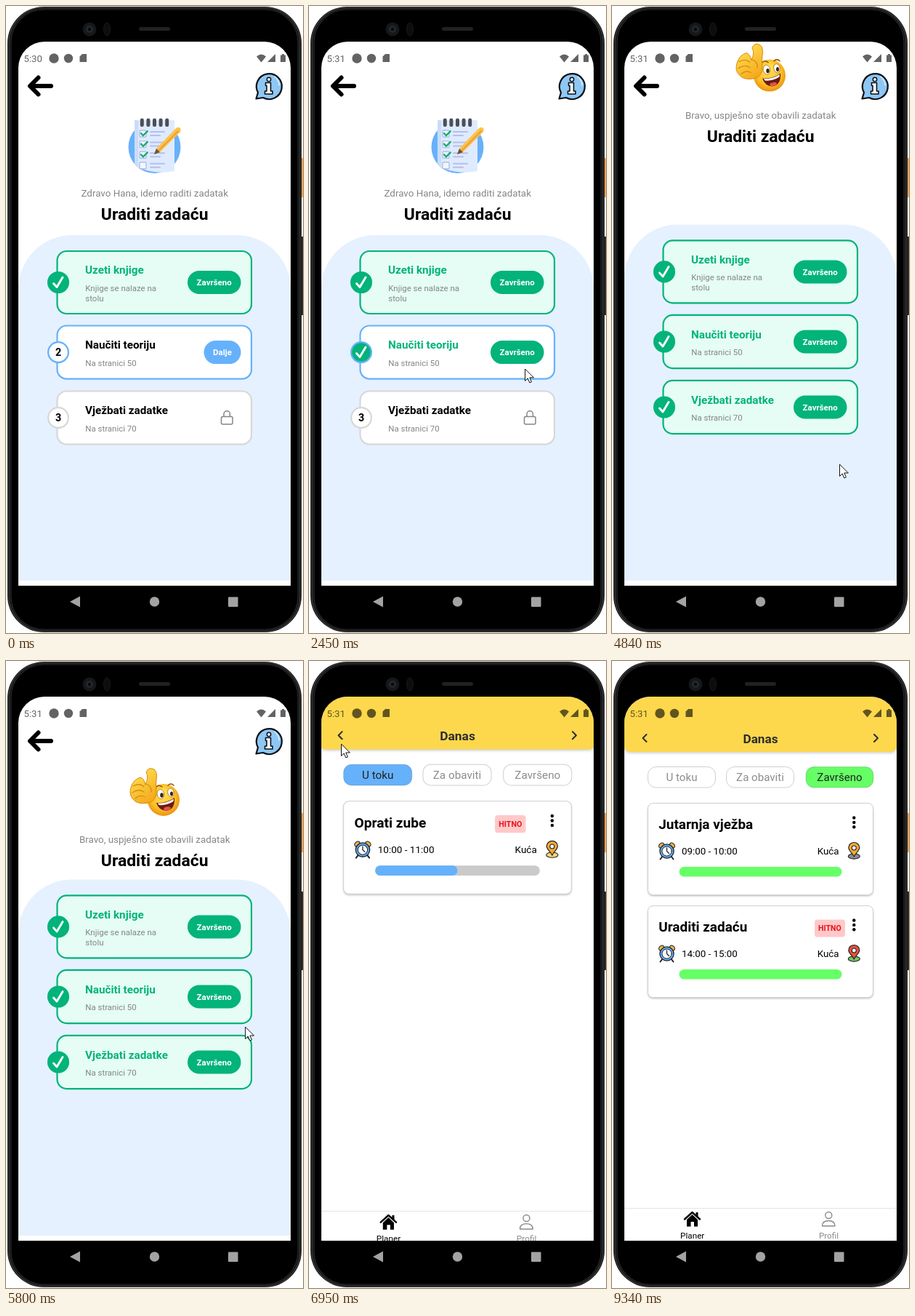
An HTML page with a canvas that plays this animation: 409x862 px, repeating every 9590 ms.

```html
<!DOCTYPE html>
<html lang="bs">
<head>
<meta charset="utf-8">
<title>Planer</title>
<style>
html, body { margin: 0; width: 100%; height: 100%; overflow: hidden; background: #fff; }
canvas { display: block; width: 409px; height: 862px; }
</style>
</head>
<body>
<canvas id="stage"></canvas>
<script>
const W = 409, H = 862, LOOP = 9590;
const GREEN = '#02b37a', MINT = '#e5fdf5', BLUE = '#66b1fb', GREY = '#d8d8d8', MUTED = '#858585';
const LIME = '#66ff66';
const canvas = document.getElementById('stage');
const c = canvas.getContext('2d');
const dpr = window.devicePixelRatio || 1;
canvas.width = W * dpr;
canvas.height = H * dpr;

const clamp = v => Math.max(0, Math.min(1, v));
const span = (t, a, b) => clamp((t - a) / (b - a));
const inOut = p => p < 0.5 ? 2 * p * p : 1 - 2 * (1 - p) * (1 - p);

function paint(fill, stroke, lw = 1) {
  if (fill) { c.fillStyle = fill; c.fill(); }
  if (stroke) { c.strokeStyle = stroke; c.lineWidth = lw; c.stroke(); }
}
function box(x, y, w, h, r, fill, stroke, lw) {
  c.beginPath();
  c.roundRect(x, y, w, h, r);
  paint(fill, stroke, lw);
}
function disc(x, y, r, fill, stroke, lw) {
  c.beginPath();
  c.arc(x, y, r, 0, 7);
  paint(fill, stroke, lw);
}
function oval(x, y, rx, ry, turn, fill, stroke, lw) {
  c.beginPath();
  c.ellipse(x, y, rx, ry, turn, 0, 7);
  paint(fill, stroke, lw);
}
function path(d, fill, stroke, lw) {
  const p = new Path2D(d);
  if (fill) { c.fillStyle = fill; c.fill(p); }
  if (stroke) { c.strokeStyle = stroke; c.lineWidth = lw; c.stroke(p); }
}
function text(s, x, y, size, color, bold, align = 'left') {
  c.font = `${bold ? 'bold ' : ''}${size}px Roboto, sans-serif`;
  c.textAlign = align;
  c.fillStyle = color;
  c.fillText(s, x, y);
}
function at(x, y, draw) {
  c.save();
  c.translate(x, y);
  draw();
  c.restore();
}
function zoomed(k, alpha, draw) {
  c.save();
  c.globalAlpha = alpha;
  c.translate(204.5, 423);
  c.scale(k, k);
  c.translate(-204.5, -423);
  draw();
  c.restore();
}

function phone() {
  c.fillStyle = '#fff';
  c.fillRect(0, 0, W, H);
  c.fillStyle = '#e4e4e4';
  c.fillRect(44, 0, 320, 1);
  box(405, 209, 5, 54, 1, '#e8a14c');
  box(405, 317, 5, 108, 1, '#2a2a2a');
  box(2, 1, 405, 860, 50, '#161616');
  box(4, 2.5, 401, 857, 48, null, '#3c3e40', 1.2);
  box(7, 5, 395, 852, 45, '#000', '#242526', 1.2);
  disc(115, 32, 9.5, '#161718');
  disc(115, 32, 5, '#25282b');
  disc(115, 32, 2.2, '#07090c');
  oval(139, 32, 4.5, 9, 0, '#0d0d0e', '#19191a', 1);
  box(183, 29, 43, 5, 2.5, '#202122');
  path('M88 819 L102 811.5 V826.5 Z', '#a3a3a3');
  disc(204.5, 819, 6.7, '#a3a3a3');
  box(306, 812.5, 13.5, 13.5, 1, '#a3a3a3');
}

function statusBar(t) {
  const ink = 'rgba(0,0,0,.61)';
  text(t < 900 ? '5:30' : '5:31', 24.5, 76.5, 13.2, ink);
  disc(66, 72, 6.7, ink);
  disc(86, 72, 6.2, ink);
  path('M105 66 H111 V77 H101.5 V69.5 Z', ink);
  path('M345 69.5 Q351.5 63.5 358 69.5 L351.5 77.5 Z', ink);
  path('M371 66 V77 H360 Z', ink);
  path('M378 67.5 H380 V66 H383 V67.5 H385 V77 H378 Z', ink);
}

function infoIcon() {
  path('M347 119 A17.5 17.5 0 1 1 354 126 L344.5 127.5 Z', '#8fc7f4', '#0b1018', 2.2);
  path('M370 97 Q376 102 376 109', null, '#d8efff', 1.6);
  path('M357.5 105.5 H364.5 V117 H367 V121 H356.5 V117 H359 V109.5 H357.5 Z', '#fff', '#0b1018', 1.6);
  disc(362, 101, 2.7, '#fff', '#0b1018', 1.5);
}

function notebook() {
  disc(204.5, 194, 36, '#68b1fa');
  path('M177 157 H232 V227 Q205 232 182 222 Z', '#deebfe');
  path('M177 157 H182 V223 L177 217 Z', '#c9dcf8');
  for (let i = 0; i < 5; i++) box(184.8 + i * 8.6, 154.5, 5, 11.5, 2.3, '#4d4e58');
  for (let i = 0; i < 4; i++) {
    const y = 171 + i * 14.6;
    box(184, y, 9, 9, 1, '#f2f7ff', '#b4bee9', 1.4);
    box(198, y + 1, 21, 2, 1, '#b7bfe9');
    box(198, y + 6, 15, 2, 1, '#b7bfe9');
    if (i < 3) path(`M186 ${y + 4} l2.8 3.2 l6 -6`, null, '#1aae72', 2.4);
  }
  path('M204 204 L207 196 L233 169 Q237 165 240 168 Q242 172 238 175 L212 201 Z', '#fdc24b');
  path('M210 199 L237 172', null, '#f09d32', 2);
  path('M204 204 L207 196 L212 201 Z', '#685448');
}

function thumbsUp() {
  const g = c.createRadialGradient(215, 181, 3, 217, 190, 25);
  g.addColorStop(0, '#ffe258');
  g.addColorStop(0.65, '#fdbd25');
  g.addColorStop(1, '#e58a0c');
  disc(217, 191, 22, g);
  oval(213, 183, 4.8, 6.6, -0.2, '#fff', '#a8680b', 0.8);
  oval(227, 181, 4.3, 6, -0.2, '#fff', '#a8680b', 0.8);
  oval(214.5, 184.5, 2.2, 3.2, 0, '#3c2310');
  oval(228, 182.5, 2, 3, 0, '#3c2310');
  path('M206 174 Q210 169 215 173 M223 171 Q227 167 231 171', null, '#8f560b', 1.5);
  path('M207 195 Q221 196 232 188 Q233 204 221 206 Q211 206 207 195 Z', '#6b1c10');
  path('M209 195.5 Q221 196 231 189.5 L230.5 193 Q221 199 210.5 198 Z', '#fff');
  oval(222, 203, 5, 2.5, -0.2, '#e5524a');
  const h = c.createLinearGradient(174, 155, 203, 196);
  h.addColorStop(0, '#ffe052');
  h.addColorStop(1, '#f4a316');
  path('M192 170 Q197 160 193 153 Q196 145 204 149 Q209 153 207 164 Q206 171 207 178 Q208 191 197 195 Q181 198 175 190 Q169 184 172 174 Q175 163 185 160 Q190 161 192 170 Z', h, '#d98a0c', 1);
  path('M175 172 Q184 167 190 173 M174 181 Q183 175 190 180 M178 189 Q185 183 191 187 M193 169 Q201 172 200 180', null, '#d88c10', 1.3);
}

function badge(y, n, done, ring) {
  disc(72, y, 13.9, done ? GREEN : '#fff', ring, 2.3);
  if (done) path(`M65.5 ${y + 1.5} L70 ${y + 6.5} L78 ${y - 7}`, null, '#fff', 2.9);
  else text(n, 72, y + 5.2, 14.3, '#000', true, 'center');
}

// state: locked, active, checked (tick shown, card still blue), done
function stepCard(n, y, h, title, lines, state) {
  const full = state === 'done', ticked = full || state === 'checked';
  const edge = full ? GREEN : state === 'locked' ? GREY : BLUE;
  const mid = y + h / 2, top = mid - lines.length * 6.8;
  box(70.5, y + 1, 267.5, h - 2, 13, full ? MINT : '#fff', edge, 2.2);
  badge(mid, n, ticked, edge);
  text(title, 109, top + 2, 15.28, ticked ? GREEN : '#000', true);
  lines.forEach((s, i) => text(s, 109.3, top + 25.5 + i * 13.6, 11.46, MUTED));
  if (ticked) {
    box(250, mid - 16, 73.5, 32, 16, GREEN);
    text('Završeno', 286.7, mid + 4.3, 11.5, '#fff', true, 'center');
  } else if (state === 'active') {
    box(272.5, mid - 16, 51, 32, 16, BLUE);
    text('Dalje', 298, mid + 4.3, 11.5, '#fff', true, 'center');
  } else {
    box(296.5, mid - 1.5, 15.5, 10.5, 2, null, '#858585', 1.5);
    path(`M300 ${mid - 2} v-3.2 a4.2 4.2 0 0 1 8.4 0 v3.2`, null, '#858585', 1.5);
  }
}

function taskScreen(t) {
  const over = t >= 4520, up = over ? -14.6 : 0;
  c.fillStyle = '#fff';
  c.fillRect(17, 49, 375, 748);
  box(17, 315 + up, 375, 475 - up, [74, 74, 0, 0], '#e5f1fe');
  path('M62 110 H34 M44.5 98.5 L33 110 L44.5 121.5', null, '#000', 6);
  infoIcon();
  const second = t < 2090 ? 'active' : t < 2550 ? 'checked' : 'done';
  const third = t < 2550 ? 'locked' : t < 3710 ? 'active' : over ? 'done' : 'checked';
  stepCard(1, 336 + up, 88, 'Uzeti knjige', ['Knjige se nalaze na', 'stolu'], 'done');
  stepCard(2, 438.5 + up, 75.2, 'Naučiti teoriju', ['Na stranici 50'], second);
  stepCard(3, 528.5 + up, 75.2, 'Vježbati zadatke', ['Na stranici 70'], third);
  if (over) {
    at(0, -192 * (1 - inOut(span(t, 4520, 5160))), () => {
      thumbsUp();
      text('Bravo, uspješno ste obavili zadatak', 204.7, 250, 13.37, MUTED, false, 'center');
      text('Uraditi zadaću', 204.7, 282, 22.9, '#000', true, 'center');
    });
  } else {
    notebook();
    text('Zdravo Hana, idemo raditi zadatak', 204.7, 262, 13.37, MUTED, false, 'center');
    text('Uraditi zadaću', 204.7, 294, 22.9, '#000', true, 'center');
  }
}

function clock() {
  path('M-6 7 L-9 11 M6 7 L9 11', null, '#20242c', 2);
  oval(-7.5, -8, 4, 2.8, -0.75, '#f5b546', '#20242c', 1.1);
  oval(7.5, -8, 4, 2.8, 0.75, '#f5b546', '#20242c', 1.1);
  disc(0, 0, 9.6, '#62aef2', '#20242c', 1.3);
  disc(0, 0, 6.6, '#fff', '#20242c', 1);
  path('M0 -4.5 V0 L3 3', null, '#20242c', 1.3);
}
function pin(color, ground) {
  oval(0, 7.5, 8, 3.6, 0, ground, '#20242c', 1.1);
  path('M0 8 C-2 3 -7.5 0 -7.5 -4.5 A7.5 7 0 0 1 7.5 -4.5 C7.5 0 2 3 0 8 Z', color, '#20242c', 1.2);
  disc(0, -4, 3, '#fff', '#20242c', 1.1);
}

function planCard(y, title, time, done, urgentX, pinColor, ground) {
  c.save();
  c.shadowColor = 'rgba(0,0,0,.28)';
  c.shadowBlur = 3 * dpr;
  c.shadowOffsetY = 1.5 * dpr;
  box(49.5, y + 0.5, 310, 126, 7, '#fff');
  c.restore();
  box(49.5, y + 0.5, 310, 126, 7, null, '#d0d0d0', 1);
  text(title, 64.3, y + 36, 18.9, '#000', true);
  if (urgentX) {
    box(urgentX, y + 19.5, 42, 24, 4, '#ffc9c9');
    text('HITNO', urgentX + 21, y + 35.3, 10.6, '#e8141c', true, 'center');
  }
  for (let i = 0; i < 3; i++) disc(333.3, y + 20.5 + i * 6.4, 2.2, '#000');
  at(75.5, y + 66.5, clock);
  text(time, 96, y + 71, 13.37, '#000');
  text('Kuća', 312.5, y + 71, 13.37, '#000', false, 'right');
  at(333.3, y + 66, () => pin(pinColor, ground));
  box(92.5, y + 88, 224, 13.5, 6.7, done ? LIME : '#cacaca');
  if (!done) box(92.5, y + 88, 112, 13.5, 6.7, BLUE);
}

function tab(x, label, fill) {
  box(x + 0.5, 145.5, 93, 28.5, 11, fill || '#fff', fill ? 'rgba(0,0,0,.16)' : '#cfcfcf', 1);
  text(label, x + 47, 165.2, 15.1, fill ? '#222' : '#8c8c8c', false, 'center');
}

function planner(t) {
  c.fillStyle = '#fff';
  c.fillRect(17, 49, 375, 748);
  c.save();
  c.shadowColor = 'rgba(0,0,0,.25)';
  c.shadowBlur = 4 * dpr;
  c.shadowOffsetY = dpr;
  box(17, 40, 375, 85, [0, 0, 8, 8], '#fdd84d');
  c.restore();
  text('Danas', 204.5, 112.5, 17.2, '#2d2d2d', true, 'center');
  path('M47.5 101 L42.5 106 L47.5 111 M361 101 L366 106 L361 111', null, '#2d2d2d', 2);
  const picked = t >= 7860;
  tab(49, 'U toku', !picked && BLUE);
  tab(157, 'Za obaviti');
  tab(266.5, 'Završeno', picked && LIME);
  if (t < 8150) {
    planCard(195, 'Oprati zube', '10:00 - 11:00', false, 255.5, '#f9a931', '#f7d774');
  } else {
    planCard(195, 'Jutarnja vježba', '09:00 - 10:00', true, 0, '#f9a931', '#8d8d8d');
    planCard(336, 'Uraditi zadaću', '14:00 - 15:00', true, 279, '#ea4f3d', '#72c85a');
  }
  c.fillStyle = '#e4e4e4';
  c.fillRect(17, 752, 375, 1);
  path('M100 767.5 L110.5 758 L121 767.5', null, '#000', 2.4);
  path('M103 768 L110.5 761 L118 768 V777.5 H113 V771 H108.5 V777.5 H103 Z M115.5 758 H118.5 V764 H115.5 Z', '#000');
  disc(298.3, 762, 4.5, null, '#8a8a8a', 1.4);
  path('M289.5 776.8 Q289.5 769.5 298.3 769.5 Q307 769.5 307 776.8 Z', null, '#8a8a8a', 1.4);
  text('Planer', 110.7, 794, 11.7, '#000', false, 'center');
  text('Profil', 298.5, 794, 11.7, '#8a8a8a', false, 'center');
}

// time, x, y
const route = [
  [460, 409, 688], [700, 372, 610], [950, 325, 525], [1180, 300, 488], [1380, 295, 480],
  [1740, 295, 480], [1770, 296, 481], [2370, 296, 481], [2750, 301, 565], [3250, 301, 565],
  [3430, 313, 630], [5340, 313, 630], [5800, 329, 504], [5900, 340, 405], [5990, 305, 250],
  [6090, 180, 120], [6170, 60, 56], [6230, 2, 85], [6280, 20, 121], [6480, 44, 114],
  [7050, 44, 114], [7300, 190, 146], [7570, 313, 160], [8400, 313, 160], [8600, 247, 290],
  [8850, 90, 560], [8960, 72, 660], [9140, 240, 760], [9330, 409, 829]
];
const clicks = [[1560, 1630], [3170, 3240], [6540, 6620], [7710, 7780]];

function cursor(t) {
  const i = route.findIndex(p => p[0] > t);
  if (i < 1) return;
  const [t0, x0, y0] = route[i - 1], [t1, x1, y1] = route[i];
  const k = span(t, t0, t1);
  at(x0 + (x1 - x0) * k, y0 + (y1 - y0) * k, () => {
    if (clicks.some(([a, b]) => t >= a && t < b)) disc(0, 0, 15, 'rgba(255,255,0,.47)');
    path('M.5 .5 V16.5 L4.2 13 L6.8 19 L9.4 17.9 L6.8 12 H12 Z', '#fff', '#111', 1);
  });
}

function draw(t) {
  c.setTransform(dpr, 0, 0, dpr, 0, 0);
  c.lineJoin = 'round';
  c.lineCap = 'round';
  phone();
  c.save();
  c.beginPath();
  c.roundRect(17, 49, 375, 748, [36, 36, 0, 0]);
  c.clip();
  if (t < 6800) {
    taskScreen(t);
  } else {
    const p = span(t, 6800, 7130), fade = 1 - span(t, 6800, 6900);
    zoomed(1 + 0.075 * (1 - p) ** 3, 1, () => planner(t));
    if (fade > 0) zoomed(0.9 + 0.1 * (1 - p) ** 3, fade, () => taskScreen(t));
  }
  statusBar(t);
  c.restore();
  cursor(t);
}

const start = performance.now();
function tick() {
  draw((performance.now() - start) % LOOP);
  requestAnimationFrame(tick);
}
tick();
</script>
</body>
</html>
```
